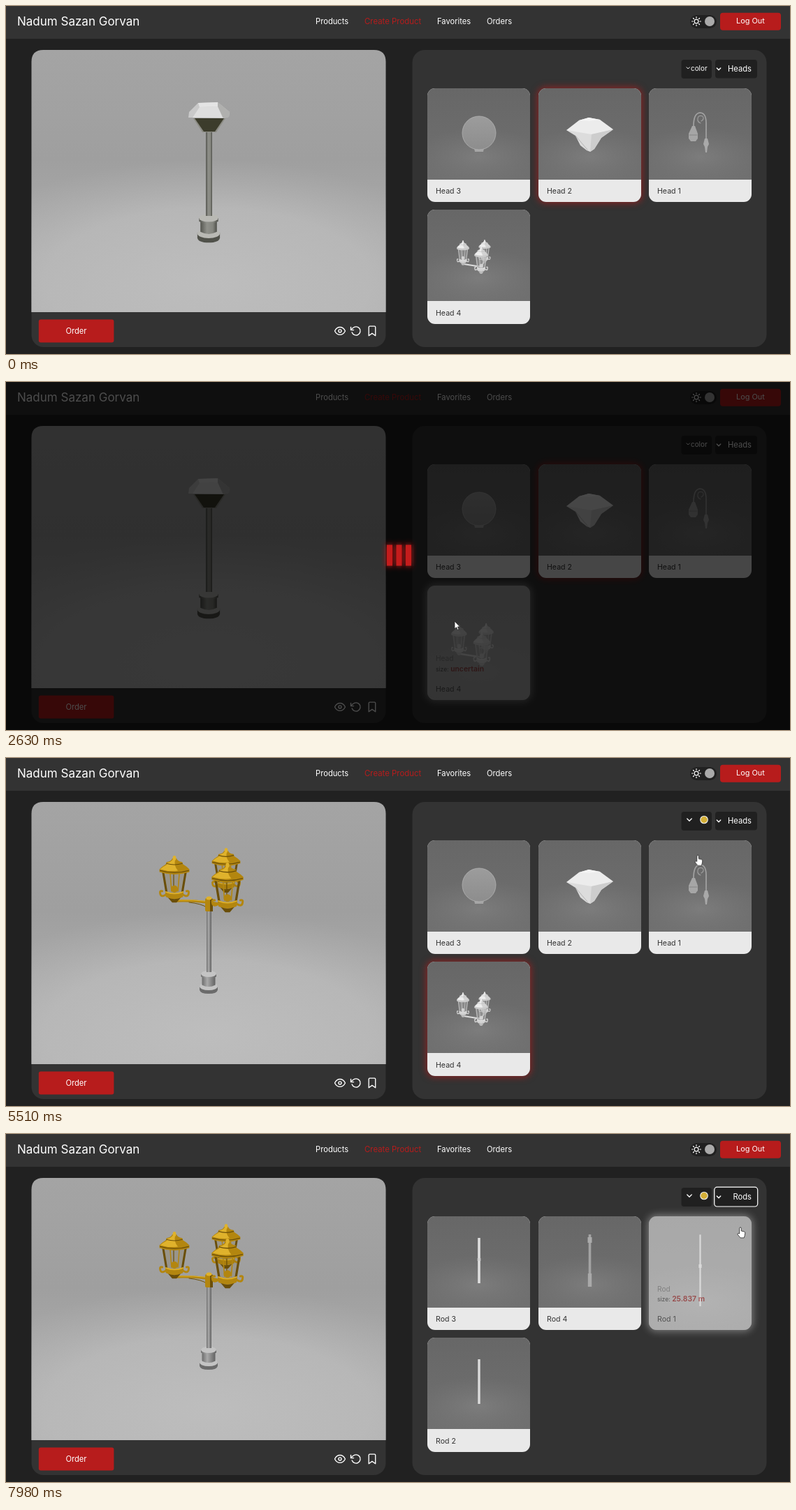
An HTML page that plays this animation: 1122x499 px, repeating every 8000 ms.

```html
<!DOCTYPE html>
<html lang="en">
<head>
<meta charset="utf-8">
<title>Create Product</title>
<style>
html, body { margin: 0; width: 100%; height: 100%; overflow: hidden; background: #212121; }
body { position: relative; font-family: Inter, "Open Sans", sans-serif; }
.layer { position: absolute; left: 0; top: 0; width: 1122px; height: 499px; }
text { font-size: 11.2px; fill: #fff; }
.card, .glow, .face { position: absolute; width: 147px; height: 163.5px; border-radius: 11px; }
.glow { left: 0; top: 0; opacity: 0; }
.hov { box-shadow: 0 0 11px 2px rgba(255, 255, 255, .36); }
.red { box-shadow: 0 0 10px 2px rgba(183, 28, 28, .62); }
.face { overflow: hidden; background: #e9e9e9; }
.face p { position: absolute; left: 12px; margin: 0; line-height: 16px; white-space: nowrap; font-size: 10.6px; color: #333; }
.face .kind { top: 96px; font-size: 10.2px; color: #909090; }
.face .size { top: 111.5px; font-size: 8.6px; }
.size b { font-size: 10.4px; font-weight: 600; color: #b71c1c; }
.face .name { top: 140.5px; }
.pic { position: absolute; left: 0; top: 0; width: 147px; height: 131px; }
.icon { fill: none; stroke: #fff; stroke-width: 2; stroke-linecap: round; stroke-linejoin: round; }
.bar { fill: #c41c1c; transform-box: fill-box; transform-origin: center; }
</style>
</head>
<body>
<svg class="layer" viewBox="0 0 1122 499">
  <defs>
    <linearGradient id="wall" x2="0" y2="1">
      <stop stop-color="#a4a4a4"/><stop offset=".42" stop-color="#9f9f9f"/><stop offset=".65" stop-color="#a9a9a9"/><stop offset="1" stop-color="#b5b5b5"/>
    </linearGradient>
    <radialGradient id="floor">
      <stop stop-color="#bdbdbd"/><stop offset=".6" stop-color="#b9b9b9" stop-opacity=".85"/><stop offset="1" stop-color="#b0b0b0" stop-opacity="0"/>
    </radialGradient>
    <linearGradient id="pole">
      <stop stop-color="#555650"/><stop offset=".4" stop-color="#8f908a"/><stop offset=".75" stop-color="#84857e"/><stop offset="1" stop-color="#4f504a"/>
    </linearGradient>
    <linearGradient id="poleLit">
      <stop stop-color="#6d6d6d"/><stop offset=".4" stop-color="#a9a9a9"/><stop offset="1" stop-color="#626262"/>
    </linearGradient>
    <linearGradient id="back" x2="0" y2="1"><stop stop-color="#676767"/><stop offset="1" stop-color="#707070"/></linearGradient>
    <radialGradient id="spot"><stop stop-color="#808080" stop-opacity=".8"/><stop offset="1" stop-color="#787878" stop-opacity="0"/></radialGradient>
    <linearGradient id="ball" x2="0" y2="1"><stop stop-color="#9c9c9c"/><stop offset="1" stop-color="#8d8d8d"/></linearGradient>
    <clipPath id="view"><path d="M36.5 439V80Q36.500 63 53.500 63H526.5Q543.5 63 543.5 80V439Z"/></clipPath>
    <filter id="blur" x="-100%" y="-50%" width="300%" height="200%"><feGaussianBlur stdDeviation="4"/></filter>
  </defs>
  <path fill="#333" d="M0 0H1122V47H0Z"/>
  <text x="16" y="28" style="font-size:17px">Nadum Sazan Gorvan</text>
  <text x="443" y="26">Products</text>
  <text x="513" y="26" style="fill:#b71c1c;font-size:11.400px">Create Product</text>
  <text x="617" y="26">Favorites</text>
  <text x="688" y="26">Orders</text>
  <rect x="979" y="13" width="38" height="19" rx="9.5" fill="#212121"/>
  <circle cx="1007" cy="22" r="7" fill="#aaa"/>
  <g class="icon" style="stroke-width:1.2"><circle cx="988" cy="22" r="2.9"/><path id="rays"/></g>
  <rect x="1022" y="9.8" width="87" height="25" rx="4" fill="#b71c1c"/>
  <text x="1065.5" y="25" text-anchor="middle" style="font-size:10.9px">Log Out</text>
  <rect x="36.5" y="63" width="507" height="426" rx="17" fill="#333"/>
  <rect x="581.5" y="63" width="507" height="426" rx="18" fill="#333"/>
  <g clip-path="url(#view)">
    <path fill="url(#wall)" d="M36 63H544V439H36Z"/>
    <ellipse cx="290" cy="395" rx="390" ry="175" fill="url(#floor)"/>
    <g id="plain"></g>
    <g id="silver"></g>
    <g id="gold"></g>
  </g>
  <rect x="46.8" y="449.6" width="107.600" height="33" rx="3" fill="#b71c1c"/>
  <text x="100.5" y="470" text-anchor="middle">Order</text>
  <g class="icon">
    <g transform="translate(469.8 457.8) scale(.68)"><path d="M1 12s4-8 11-8 11 8 11 8-4 8-11 8-11-8-11-8z"/><circle cx="12" cy="12" r="3"/></g>
    <path transform="translate(492.8 457.8) scale(.68)" d="M1 4v6h6M3.5 15a9 9 0 1 0 2.1-9.4L1 10"/>
    <path transform="translate(515.8 457.8) scale(.68)" d="M19 22l-7-5-7 5V4a2 2 0 0 1 2-2h10a2 2 0 0 1 2 2z"/>
  </g>
</svg>
<div id="cards"></div>
<svg class="layer" viewBox="0 0 1122 499">
  <rect x="966.5" y="77" width="43.5" height="27" rx="4" fill="#202020"/>
  <g id="menu"></g>
  <g id="label">
    <text x="980" y="92.5" style="font-size:9.9px">color</text>
    <path class="icon" style="stroke-width:1" d="M974 87.8l2.2 2.2 2.2-2.2"/>
  </g>
  <g id="picked">
    <path class="icon" style="stroke-width:1.3" d="M974.8 87l3.2 3.2 3.2-3.2"/>
    <circle cx="999" cy="88.5" r="5.3" fill="#d4af37" stroke="#eee" stroke-width="1.1"/>
  </g>
  <rect x="1015" y="77" width="60" height="26.5" rx="4" fill="#202020"/>
  <rect id="focus" x="1013.7" y="76.2" width="62" height="27.8" rx="4" fill="none" stroke="#fff" stroke-width="1.2"/>
  <path class="icon" style="stroke-width:1.4" d="M1017.3 89l2.7 2.7 2.7-2.7"/>
  <text id="heads" x="1067" y="94" text-anchor="end">Heads</text>
  <text id="rods" x="1067" y="94" text-anchor="end">Rods</text>
  <g id="loader"><path fill="#000" fill-opacity=".7" d="M0 0H1122V499H0Z"/></g>
  <g id="cursor" stroke="#222" stroke-width=".8" stroke-linejoin="round" fill="#fff">
    <path id="arrow" d="M0 0V11L2.6 8.7 4.3 12.4 6 11.6 4.4 8H7.6Z"/>
    <path id="hand" d="M-1.3 9V1.2a1.3 1.3 0 0 1 2.6 0V5l4 .9q1.6 .5 1.5 2l-.6 4-1 3H0L-3.8 10.2q-.8-1.4 .6-1.7Q-2.2 8.3-1.3 9Z"/>
  </g>
</svg>
<script>
const LOOP = 8000, LOAD = 2630, READY = 2900, PICK = 5420, SWAP = 7430;
const $ = s => document.querySelector(s);

// ---- drawing helpers
const poly = (fill, pts) => `<polygon fill="${fill}" points="${pts}"/>`;
const oval = (x, y, rx, ry, fill) => `<ellipse cx="${x}" cy="${y}" rx="${rx}" ry="${ry}" fill="${fill}"/>`;
const line = (d, color, w) => `<path d="${d}" fill="none" stroke="${color}" stroke-width="${w}" stroke-linecap="round"/>`;

const tones = {
  silver: { hi: '#d0d0cd', mid: '#868681', low: '#484843', glass: 'rgba(90,90,84,.16)' },
  gold: { hi: '#dfb22c', mid: '#b3860f', low: '#6a4e08', glass: 'rgba(110,82,10,.14)' },
  white: { hi: '#ededed', mid: '#d2d2d2', low: '#bababa', glass: 'rgba(160,160,160,.45)' }
};

const lantern = (x, y, s, c, sx = s) => `<g transform="translate(${x} ${y}) scale(${sx} ${s})">` +
  `<path fill="${c.glass}" d="M-16 22H16L11 52H-11Z"/>` +
  line('M-6 24L-4 50M7 24L5 50', c.mid, 1.5) +
  line('M-16 22L-11 52M16 22L11 52', c.low, 3) + line('M-1 24V50', c.low, 1.2) +
  oval(0, 47, 5, 5, c.mid) +
  line('M-11 54Q-19 60-20 53Q-21 49-17 50M11 54Q19 60 20 53Q21 49 17 50', c.mid, 2.8) +
  `<path fill="${c.mid}" d="M-13 50Q0 55 13 50L12 58Q0 64-12 58Z"/>` +
  `<path fill="${c.low}" d="M-9 59Q0 63 9 59L3 66H-3Z"/>` +
  line('M-12 51Q0 56 12 51', c.hi, 1.5) +
  `<path fill="${c.mid}" d="M-3 4Q-4 8-11 9L-12 12Q-17 15-21 19V23Q0 30 21 23V19Q17 15 12 12L11 9Q4 8 3 4Z"/>` +
  `<path fill="${c.hi}" d="M-2 5Q-4 9-10 10L-11 13Q-17 16-20 19Q-6 23 5 21Q-1 15 1 6Z"/>` +
  line('M-11 11Q0 14.5 11 11M-20 21Q0 27 20 21', c.low, 1.2) +
  oval(0, 3.5, 2.4, 3.5, c.hi) + '</g>';

const foot = (y, s, lit) => {
  const body = lit ? 'url(#poleLit)' : 'url(#pole)', top = lit ? '#c4c4c4' : '#b9b9b4';
  return `<g transform="translate(290 ${y}) scale(${s})">` +
    `<path fill="${lit ? '#6b6b6b' : '#50514a'}" d="M-13 21V27Q-12 32.5 0 32.5T13 27V21Z"/>` + oval(0, 22, 13, 5.5, top) +
    `<path fill="${body}" d="M-9.5 7V20Q0 25 9.5 20V7Z"/>` +
    `<path fill="${body}" d="M-11 4V8Q0 13 11 8V4Z"/>` + oval(0, 4, 11, 4.5, top) + '</g>';
};
const pole = (y, w, h, lit) => `<rect x="${290.5 - w / 2}" y="${y}" width="${w}" height="${h}" fill="url(#pole${lit ? 'Lit' : ''})"/>`;

const triple = (c, lit) => foot(305.5, 1, lit) + pole(214, 7, 93, lit) +
  lantern(315, 129, .97, c) + line('M243 205Q266 204 288 207M293 207L317 212', c.mid, 3.6) +
  line('M246 204Q268 203 288 205.5', c.hi, 1) + line('M262 207Q280 209 287 214', c.low, 1) +
  lantern(241, 140, 1.02, c) +
  `<rect x="285" y="201" width="11" height="19" rx="2" fill="${c.mid}"/><path fill="${c.low}" d="M292 202h4v18h-4z"/>` +
  oval(290.5, 201, 4, 2.5, c.hi) + lantern(317, 150, 1.08, c);

$('#plain').innerHTML = foot(299, 1.24) + pole(179, 9, 122) +
  poly('#8b8b83', '268,161 314,161 301,181 281,181') +
  poly('#3c3c2c', '270,161 312,161 299,180 283,180') +
  poly('#c9c9c9', '275,139 303,138 320,152 319,159 311,161 261,160 262,152') +
  poly('#dedede', '277,145 303,144 310,160 267,160') +
  poly('#b0b0ae', '303,138 320,152 319,159 311,161 303,144') +
  poly('#e4e4e4', '275,139 303,138 303,144 277,145');
$('#silver').innerHTML = triple(tones.silver);
$('#gold').innerHTML = triple(tones.gold, true);

$('#rays').setAttribute('d', Array.from({ length: 8 }, (_, i) => {
  const a = i * Math.PI / 4, at = r => `${988 + r * Math.cos(a)} ${22 + r * Math.sin(a)}`;
  return `M${at(5)}L${at(6.4)}`;
}).join(''));

$('#menu').innerHTML = '<rect x="966.5" y="77" width="43.5" height="135" rx="4" fill="#1f1f1f"/>' +
  ['#a07b7b', '#b87430', '#b9992f', '#a3a3a3', '#686868', '#292929'].map((c, i) =>
    `<rect x="980.5" y="${99 + i * 18.8}" width="15.5" height="12.6" rx="6" fill="${c}" stroke="#ccc" stroke-width="1.1"/>`).join('');

// ---- cards
const rod = (x, y, h, w, c) => `<rect x="${x - w / 2}" y="${y}" width="${w}" height="${h}" fill="${c}"/>`;
const art = {
  'Head 3': `<path fill="#a5a5a5" d="M67 86H81L80 91H68Z"/><circle cx="74" cy="64" r="24" fill="url(#ball)" stroke="#b2b2b2" stroke-width=".8"/>`,
  'Head 2': poly('#dcdcdc', '40,60 53,68 60,82 69,89 74,91 80,87 90,71 107,59') +
    poly('#ececec', '40,60 58,46 72,42 88,45 107,59 76,66') +
    poly('#f4f4f4', '58,46 72,42 88,45 73,47') + poly('#cdcdcd', '76,66 107,59 90,71 80,87 74,91') +
    line('M53 68L70 88', '#b5b5b5', 1),
  'Head 1': line('M82 78V50Q82 35 73 35Q64 36 64 54', '#a3a3a3', 1.7) + line('M74 50q-5-2-4-7t7-3q3 4-2 7', '#9c9c9c', 1.2) +
    `<path fill="#a6a6a6" d="M62 54H66L70 65V72L67 76H60L57 72V65Z"/>` + line('M58 67H69', '#858585', 1) +
    `<path fill="#a9a9a9" d="M80 72H84L86 80 84 84 83 92H81L80 84 78 80Z"/>`,
  'Head 4': line('M52 78L77 82M78 80L83 72', '#dcdcdc', 2) + lantern(82, 43, .5, tones.white, .4) +
    lantern(51, 44, .54, tones.white, .42) + lantern(77, 53, .59, tones.white, .46),
  'Rod 3': rod(74, 31, 65, 3.6, '#dedede') + rod(74, 60, 4, 4.6, '#cfcfcf'),
  'Rod 4': rod(73.5, 26, 60, 3.6, '#a3a3a3') + rod(73.5, 30, 8, 6, '#ababab') + rod(73.5, 82, 19, 5.4, '#a9a9a9'),
  'Rod 1': rod(73.5, 21, 82, 1.8, '#c9c9c9') + rod(73.5, 55, 4, 3.4, '#c9c9c9'),
  'Rod 2': rod(74, 31, 64, 3.4, '#dcdcdc')
};
const spots = [[603, 117.5], [762, 117.5], [920, 117.5], [603, 292]];

function card(name, spot, size) {
  const el = document.createElement('div'), [x, y] = spots[spot];
  el.className = 'card';
  el.style.cssText = `left:${x}px;top:${y}px`;
  el.innerHTML = `<i class="glow hov"></i><i class="glow red"></i><div class="face">
    <p class="kind">${name.split(' ')[0]}</p><p class="size">size: <b>${size}</b></p><p class="name">${name}</p>
    <svg class="pic" viewBox="0 0 147 131" preserveAspectRatio="xMidYMid slice">
    <path fill="url(#back)" d="M0 0H147V131H0Z"/><ellipse cx="74" cy="98" rx="92" ry="42" fill="url(#spot)"/>${art[name]}</svg></div>`;
  $('#cards').append(el);
  return el;
}
const heads = ['Head 3', 'Head 2', 'Head 1', 'Head 4'].map((n, i) => card(n, i, 'uncertain'));
const rods = ['Rod 3', 'Rod 4', 'Rod 1', 'Rod 2'].map((n, i) => card(n, i, '25.837 m'));

$('#loader').innerHTML += [545, 558.5, 572].map(x =>
  `<g class="bar"><rect x="${x}" y="233" width="8" height="31" filter="url(#blur)"/><rect x="${x}" y="233.5" width="8" height="30"/></g>`).join('');

// ---- motion: steps are [ms, value, easing to the next step]
function track(el, steps, style) {
  const all = [...steps];
  if (all[0][0] > 0) all.unshift([0, all[0][1]]);
  if (all.at(-1)[0] < LOOP) all.push([LOOP, all.at(-1)[1]]);
  el.animate(all.map(([t, v, easing = 'linear']) => ({ offset: t / LOOP, easing, ...style(v) })),
    { duration: LOOP, iterations: Infinity });
}
const fade = v => ({ opacity: v });
function shown(el, ...spans) {
  const steps = spans.flatMap(([a, b]) => [[a, 1, 'step-end'], [b, 0, 'step-end']]);
  if (steps[0][0] > 0) steps.unshift([0, 0, 'step-end']);
  track(el, steps, fade);
}

function hover(el, ...steps) {
  const eased = steps.map(([t, v]) => [t, v, 'ease']);
  track(el.querySelector('.pic'), eased, v => ({ height: 131 + 33 * v + 'px', opacity: 1 - .5 * v }));
  track(el.querySelector('.hov'), eased, fade);
}
const red = i => heads[i].querySelector('.red');

shown($('#plain'), [0, READY]);
shown($('#silver'), [READY, PICK]);
shown($('#gold'), [PICK, LOOP]);
shown($('#loader'), [LOAD, READY]);
shown($('#menu'), [3980, PICK]);
shown($('#label'), [0, PICK]);
shown($('#picked'), [PICK, LOOP]);
shown($('#heads'), [0, SWAP]);
shown($('#rods'), [SWAP, LOOP]);
shown($('#focus'), [SWAP, LOOP]);
heads.forEach(el => shown(el, [0, SWAP]));
rods.forEach(el => shown(el, [SWAP, LOOP]));
shown(red(1), [0, READY]);
track(red(3), [[READY, 0, 'ease'], [READY + 400, 1]], fade);

hover(heads[3], [1430, 0], [1930, 1], [2660, 1], [2880, 0], [2915, 0], [3415, 1], [3530, 1], [4030, 0]);
hover(heads[1], [3560, 0], [3640, .25], [3960, 0]);
hover(heads[2], [3660, 0], [3740, .25], [4080, 0], [5550, 0], [6050, 1], [6380, 1], [6880, 0]);
hover(rods[2], [SWAP, 0], [SWAP + 500, 1]);

document.querySelectorAll('.bar').forEach((el, i) => {
  const t = LOAD + i * 50;
  track(el, [[t, 1, 'ease-in-out'], [t + 120, 1.3, 'ease-in-out'], [t + 240, 1]], v => ({ transform: `scaleY(${v})` }));
});

shown($('#cursor'), [1060, LOOP]);
shown($('#arrow'), [0, 1380], [LOAD, READY], [6200, SWAP]);
shown($('#hand'), [1380, LOAD], [READY, 6200], [SWAP, LOOP]);
track($('#cursor'), [
  [1060, [1098, 485], 'cubic-bezier(.3,.3,.3,1)'], [1610, [630, 338], 'ease-out'], [1810, [626, 330]],
  [2100, [626, 330], 'ease-in-out'], [2490, [642, 343]],
  [3400, [642, 343], 'cubic-bezier(.2,.5,.3,1)'], [4190, [997, 90], 'ease-in-out'],
  [4680, [988, 211], 'ease-in-out'], [5080, [988, 139]],
  [5450, [988, 139], 'ease-in-out'], [5870, [1036, 150], 'ease-in-out'],
  [6280, [1022, 116], 'ease-in-out'], [6690, [1046, 97], 'ease-out'], [6890, [1052, 88]],
  [6980, [1052, 88], 'ease-in-out'], [7230, [1046, 151]],
  [SWAP, [1046, 151], 'ease-out'], [7750, [1051, 134]]
], ([x, y]) => ({ transform: `translate(${x}px, ${y}px)` }));
</script>
</body>
</html>
```
